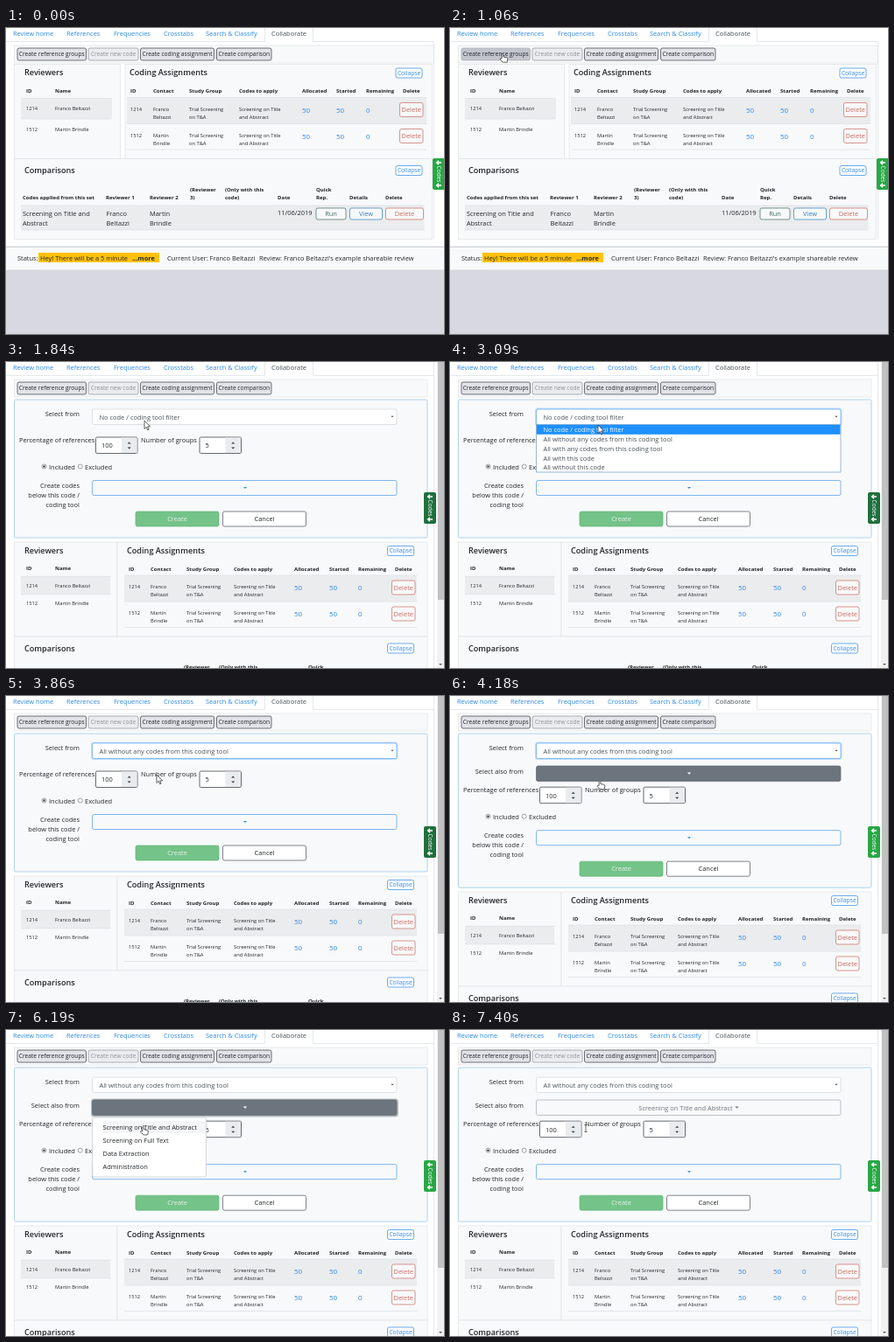
An HTML page that plays this animation: 500 px wide and 350 px high, repeating every 8000 ms.

```html
<!DOCTYPE html>
<html lang="en">
<head>
<meta charset="utf-8">
<title>Collaborate</title>
<style>
html, body { margin: 0; width: 100%; height: 100%; overflow: hidden; background: #fff; }
svg { display: block; width: 100vw; height: 100vh; }
text { font-family: "Open Sans", "Noto Sans", sans-serif; }
</style>
</head>
<body>
<svg viewBox="0 0 500 350"><g id="page"></g><g id="cursor"></g></svg>
<script>
const LOOP = 8000;
const BODY = 7.45, SMALL = 5.75, HEAD = 6.05, BUTTON = 6.65, TITLE = 9.15;
const INK = '#212529', BLUE = '#2a88e8', RED = '#c8695f', GREY = '#6c757d', PALE = '#f8f9fa';

// Event times in ms
const PANEL = 1150, LIST_OPEN = 2310, LIST_CLOSE = 3860, ROW_ADDED = 3940,
  HOVER_ROW = 4180, MENU_OPEN = 4560, PRESS = 6700, MENU_CLOSE = 7330, SETTLED = 7400;

// Pointer path: time, x, y
const path = [
  [210, 347, 278], [980, 60, 29], [1530, 60, 29], [1840, 158, 67], [1990, 158, 67],
  [2310, 169, 72], [3090, 169, 72], [3240, 171, 100], [3390, 172, 90], [3860, 172, 90],
  [4030, 172, 97], [4180, 171, 96.5], [4410, 171, 96.5], [4720, 166, 93.5], [5030, 165.5, 94],
  [5260, 165, 95], [5560, 160, 107], [5730, 160, 107], [5880, 157.5, 109], [6190, 156.5, 109.7], [7330, 155, 108.5]
];
const cursors = {
  arrow: '<path d="M0 0V9.5L2.2 7.4 3.7 10.8 5.1 10.2 3.7 6.9H6.6Z" fill="#fff" stroke="#222" stroke-width=".7"/>',
  hand: '<path d="M-.9 6V.8Q0-.6 .9.8V4l4 .9q1 .3 .9 1.5L5.2 10.2H.3L-2.8 6.8q-.2-1.3 1.1-.9Z" fill="#fff" stroke="#222" stroke-width=".7"/>',
  beam: '<path d="M-1.5 0H1.5M0 0V8M-1.5 8H1.5" fill="none" stroke="#333" stroke-width=".7"/>'
};

const rect = (x, y, w, h, fill, stroke = 'none', r = 0, sw = .7) =>
  `<rect x="${x}" y="${y}" width="${w}" height="${h}" rx="${r}" fill="${fill}" stroke="${stroke}" stroke-width="${sw}"/>`;
const line = (d, color = '#dee2e6', w = .8) => `<path d="${d}" fill="none" stroke="${color}" stroke-width="${w}"/>`;
// y is the middle of the capitals
const text = (x, y, s, size = BODY, fill = INK, weight = 400, anchor = 'start') =>
  `<text x="${x}" y="${y + size * .36}" font-size="${size}" fill="${fill}" font-weight="${weight}" text-anchor="${anchor}">${s}</text>`;
const stack = (x, y, rows, gap, ...style) => rows.map((s, i) => text(x, y + i * gap, s, ...style)).join('');
const button = (x, y, w, h, s, color, fill = 'none', size = BODY, border = color) =>
  rect(x, y, w, h, fill, border, 2) + text(x + w / 2, y + h / 2, s, size, color, 400, 'middle');
const triangle = (x, y, r, color, up = 1) =>
  `<path d="M${x - r} ${y - r * up / 2}h${2 * r}l${-r} ${r * up}Z" fill="${color}"/>`;
const shift = (dy, s) => `<g transform="translate(0 ${dy})">${s}</g>`;

function header(hover) {
  const tabs = [[8, 'Review home'], [69, 'References'], [123, 'Frequencies'], [180, 'Crosstabs'], [228, 'Search &amp; Classify']];
  return line('M0 15.5H295.5V0M350.5 0V15.5H488') +
    tabs.map(([x, s]) => text(x, 6.5, s, BODY, BLUE)).join('') +
    text(303, 6.5, 'Collaborate', BODY, '#495057') +
    button(13, 23, 78.5, 14, 'Create reference groups', INK, hover ? '#c3c5cc' : '#e2e2e8', BUTTON, hover ? '#aaaeb4' : '#343a40') +
    button(94, 23, 57, 14, 'Create new code', '#8b9096', '#ececf0', BUTTON, '#8b9096') +
    button(153.5, 23, 84, 14, 'Create coding assignment', INK, '#e2e2e8', BUTTON, '#343a40') +
    button(240.5, 23, 62.5, 14, 'Create comparison', INK, '#e2e2e8', BUTTON, '#343a40');
}

function codesTab(x, color) {
  const arrow = y => line(`M${x + 10} ${y}H${x + 4.5}M${x + 7} ${y - 2.3}L${x + 4.5} ${y}L${x + 7} ${y + 2.3}`, '#fff', 1.3);
  return rect(x, 149, 14, 36, color, 'none', 2) + arrow(154) + arrow(180) +
    `<text transform="translate(${x + 5} 167) rotate(90)" font-size="6.6" fill="#fff" text-anchor="middle">Codes</text>`;
}

function tables(narrow) {
  const at = (wide, tight) => narrow ? tight : wide;
  const right = at(486.5, 481), split = at(130.5, 127);
  const people = [['1214', 'Franco', 'Beltazzi'], ['1512', 'Martin', 'Brindle']];
  const heads = (y, list) => list.map(([x, s]) => text(x, y, s, HEAD, INK, 700)).join('');
  const collapse = y => button(at(445, 435.5), y, 30, 11, 'Collapse', BLUE, '#fff', BUTTON);
  let s = rect(9.5, 41.5, split - 9.5, 108, PALE, '#dfe2e5') + rect(at(136, 127), 41.5, right - at(136, 127), 108, PALE, '#dfe2e5') +
    text(21, 51, 'Reviewers', TITLE, INK, 600) + text(at(141, 138), 51, 'Coding Assignments', TITLE, INK, 600) + collapse(46);

  // Reviewers
  const rowH = at(23.5, 20.5), top = at(80.5, 80.8);
  s += rect(17, top, at(104, 102), rowH, '#ebecee') + line(`M17 ${top}h103M17 ${top + rowH}h103`) +
    heads(71.5, [[23, 'ID'], [56, 'Name']]);
  people.forEach(([id, first, last], i) => {
    const y = top + rowH * (i + .5);
    s += text(23, y, id, SMALL) + text(56, y, `${first} ${last}`, SMALL);
  });

  // Coding assignments
  const cols = [at(142, 140), at(168, 165), at(209, 206), at(266, 260), at(338, 329), at(377, 369), at(411, 402), at(453, 444)];
  const left = at(138, 135), end = at(480, 469);
  s += rect(left, 79.5, end - left, 30, '#ebecee') + line(`M${left} 79.5H${end}M${left} 109.5H${end}M${left} 139H${end}`) +
    heads(72, ['ID', 'Contact', 'Study Group', 'Codes to apply', 'Allocated', 'Started', 'Remaining', 'Delete'].map((h, i) => [cols[i], h]));
  people.forEach(([id, first, last], i) => {
    const y = 92.5 + 30 * i;
    s += text(cols[0], y, id, SMALL) + stack(cols[1], y, [first, last], 9, SMALL) +
      stack(cols[2], y, ['Trial Screening', 'on T&amp;A'], 9, SMALL) +
      stack(cols[3], y, ['Screening on Title', 'and Abstract'], 9, SMALL) +
      ['50', '50', '0'].map((n, k) => text(cols[4 + k], y + 1.2, n, 8, BLUE)).join('') +
      button(at(449.5, 440.5), y - 7, 26.5, 16, 'Delete', RED, PALE);
  });

  // Comparisons
  s += rect(9.5, 149.5, right - 9.5, 92, PALE, '#dfe2e5') + text(21, 163, 'Comparisons', TITLE, INK, 600) + collapse(157.5) +
    rect(17, 203, right - 26, 28, '#ebecee') + line(`M17 203H${right - 9}M17 231H${right - 9}`) +
    heads(194, [[19, 'Codes applied from this set'], [114, 'Reviewer 1'], [164, 'Reviewer 2'], [310, 'Date'], [392, 'Details'], [433, 'Delete']]) +
    [[at(210, 203), '(Reviewer', '3)'], [at(250, 243), '(Only with this', 'code)'], [at(354, 345), 'Quick', 'Rep.']]
      .map(([x, ...rows]) => stack(x, 184.8, rows, 9, HEAD, INK, 700)).join('') +
    stack(19, 212, ['Screening on Title and', 'Abstract'], 11) +
    people.map(([, ...name], i) => stack(114.5 + 49.5 * i, 212, name, 11)).join('') +
    text(310, 211.5, '11/06/2019') +
    button(354, 206, 34, 13, 'Run', '#3d6b5d', PALE) + button(392.5, 206, 37, 13, 'View', '#2f7fb8', PALE) +
    button(433.5, 206, 43, 13, 'Delete', RED, PALE);
  return s;
}

function statusBar() {
  return rect(0, 250, 500, 26.5, PALE) + line('M0 250.3H500', '#c4c7cc', 1) + rect(0, 276.5, 500, 74, '#d8d8e0') +
    text(13, 263, 'Status:') + rect(37, 257, 138, 11, '#ffc107') +
    text(39, 263, 'Hey! There will be a 5 minute') + text(144, 263.5, '...more', BODY, INK, 700) +
    text(184, 263.5, 'Current User: Franco Beltazzi') +
    text(289, 263.5, "Review: Franco Beltazzi's example shareable review");
}

const spinner = (x, value) =>
  rect(x, 86, 47.5, 18.5, '#fff', '#555b61', 1.5, .9) + rect(x + 29.5, 86.5, 17.5, 17.5, '#e9ecef') +
  text(x + 6.5, 95.7, value) + triangle(x + 38.2, 92.6, 2, '#333', -1) + triangle(x + 38.2, 98.6, 2, '#333');

const radio = (x, on) => `<circle cx="${x}" cy="119.5" r="2.5" fill="#fff" stroke="#777" stroke-width=".7"/>` +
  (on ? `<circle cx="${x}" cy="119.5" r="1.3" fill="#444"/>` : '');

const options = ['No code / coding tool filter', 'All without any codes from this coding tool',
  'All with any codes from this coding tool', 'All with this code', 'All without this code'];

function optionList(active) {
  return rect(98.5, 71.5, 347.5, 54.5, '#fff', '#6f9ccc') + options.map((s, i) => {
    const y = 72 + i * 10.8;
    return (i === active ? rect(99, y, 346.5, 10.8, '#1e90ff') : '') +
      text(106.5, y + 5.6, s, BODY, i === active ? '#fff' : '#495057');
  }).join('');
}

function codeMenu(t, y) {
  const items = ['Screening on Title and Abstract', 'Screening on Full Text', 'Data Extraction', 'Administration'];
  return rect(98.5, 100, 130, 68, '#fff', '#c4c7ca', 2) +
    (y > 103 ? rect(111, 104, 117, 14, t >= PRESS ? '#e9ecef' : '#f4f5f7') : '') +
    stack(110.5, 111, items, 15);
}

function form(t, y) {
  const extra = t >= ROW_ADDED, gap = extra ? 18.2 : 0;
  const picked = t >= LIST_CLOSE, open = t >= LIST_OPEN && !picked;
  const focus = t >= LIST_OPEN && t < MENU_OPEN;
  let s = rect(9.5, 43, 471.5, 158 + gap, PALE, '#8fc0e8', 1.5) + text(84, 59, 'Select from', BODY, INK, 400, 'end') +
    (focus ? rect(98, 53.5, 348.5, 18.5, 'none', '#bfdeff', 2.5, 2) : '') +
    rect(98.5, 54, 347.5, 17.5, '#fff', focus ? '#5aa5ee' : '#ced4da', 2) +
    text(106.5, 63, options[picked ? 1 : 0], BODY, '#495057') + triangle(441, 62.5, 1.6, '#333');

  if (extra) {
    const dark = t >= HOVER_ROW && t < SETTLED, done = t >= MENU_CLOSE;
    const ring = t >= MENU_OPEN && t < PRESS, color = dark ? '#fff' : GREY;
    s += text(84, 86, 'Select also from', BODY, INK, 400, 'end') +
      (ring ? rect(98, 79.5, 349, 19, 'none', '#b9bec3', 2.5, 2) : '') +
      rect(98.5, 80, 347.5, 17.5, dark ? GREY : PALE, dark ? '#5f676e' : '#a3a9af', 2) +
      (done ? text(269, 89, 'Screening on Title and Abstract', BODY, color, 400, 'middle') : '') +
      triangle(done ? 327.5 : 273, 88.6, 2.2, color);
  }

  s += shift(gap,
    text(15, 89, 'Percentage of references') + spinner(102.5, '100') + text(154, 89, 'Number of groups') + spinner(221, '5') +
    radio(43.5, true) + text(49, 120, 'Included') + radio(84.7) + text(90, 120, 'Excluded') +
    ['Create codes', 'below this code /', 'coding tool'].map((row, i) => text(84, 141 + 11 * i, row, BODY, INK, 400, 'end')).join('') +
    rect(98.5, 135.5, 347.5, 17, PALE, '#4a9be8', 2) + triangle(273, 144, 2, '#2f86d6') +
    button(148, 171, 95, 17, 'Create', '#e6f5ea', '#74c389', BODY, '#5cb574') +
    button(247.5, 171, 95, 17, 'Cancel', INK, '#fff', BODY, '#4a5056'));

  if (open) s += optionList(Math.max(0, Math.min(4, Math.floor((y - 72) / 10.8))));
  if (t >= MENU_OPEN && t < MENU_CLOSE) s += codeMenu(t, y);
  return s;
}

function page(t, x, y) {
  const hover = t >= 900 && t < 1600;
  const toolbar = w => rect(9.5, 20, w, 20, PALE, '#dfe2e5');
  if (t < PANEL) {
    return toolbar(479) + header(hover) + line('M488.5 15V242') + tables(false) + statusBar() + codesTab(487, '#28a745');
  }
  return toolbar(471.5) + header(hover) + line('M488.5 0V350') +
    shift(t < ROW_ADDED ? 164.5 : 182.5, tables(true)) + form(t, y) +
    codesTab(477, t < ROW_ADDED ? '#1f6f3d' : '#28a745') +
    rect(492, 0, 8, 350, '#f1f1f1') + rect(493, 0, 7, 272, '#c1c1c1') + triangle(496, 346, 1.8, '#505050');
}

function pointer(t) {
  const next = path.findIndex(p => p[0] > t);
  if (next < 0) return path[path.length - 1].slice(1);
  if (next === 0) return path[0].slice(1);
  const [t0, x0, y0] = path[next - 1], [t1, x1, y1] = path[next];
  const k = (t - t0) / (t1 - t0), e = k * k * (3 - 2 * k);
  return [x0 + (x1 - x0) * e, y0 + (y1 - y0) * e];
}

function cursorKind(t) {
  if (t < path[0][0]) return '';
  if (t >= MENU_CLOSE) return cursors.beam;
  return (t >= 900 && t < 1600) || t >= 4030 ? cursors.hand : cursors.arrow;
}

const pageGroup = document.getElementById('page'), cursorGroup = document.getElementById('cursor');
const start = performance.now();
let shown = '';

function draw() {
  const t = (performance.now() - start) % LOOP;
  const [x, y] = pointer(t);
  const markup = page(t, x, y);
  if (markup !== shown) pageGroup.innerHTML = shown = markup;
  cursorGroup.innerHTML = `<g transform="translate(${x} ${y})">${cursorKind(t)}</g>`;
  requestAnimationFrame(draw);
}
draw();
</script>
</body>
</html>
```
